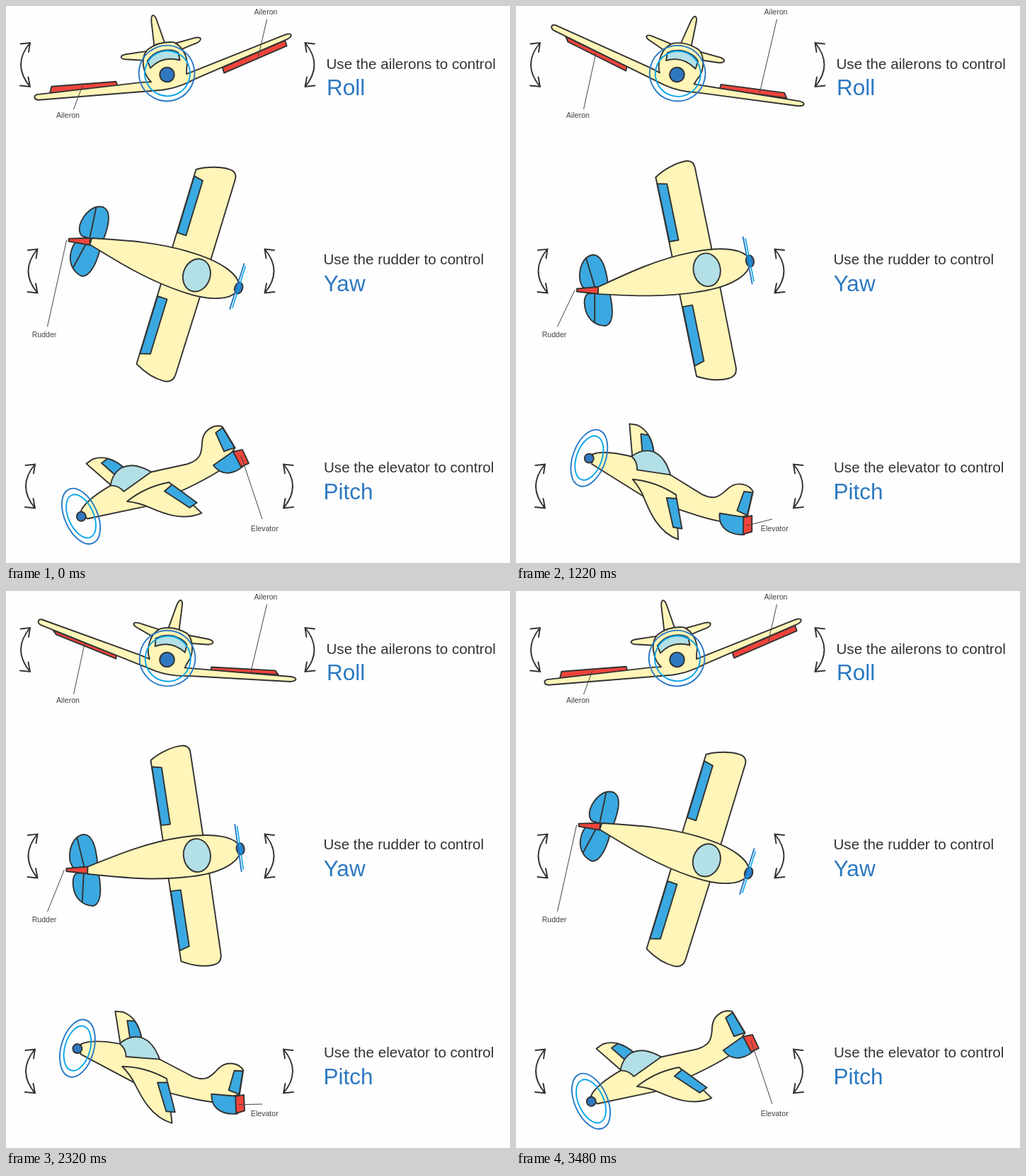
An HTML page for the animation above (3800 ms loop, 712 by 787 pixels).

```html
<!DOCTYPE html>
<html lang="en">
<head>
<meta charset="utf-8">
<title>Roll, yaw and pitch</title>
<style>
  html, body { margin: 0; width: 100%; height: 100%; overflow: hidden; background: #fefefe; }
  svg { display: block; width: 712px; height: 787px; font-family: "Liberation Sans", Arial, sans-serif; }
  .plane { stroke: #333; stroke-width: 1.9; stroke-linejoin: round; stroke-linecap: round; }
  .skin { fill: #fff5b8; }
  .flap { fill: #3aa9e1; }
  .moving { fill: #ee443b; }
  .glass { fill: #b2e0e6; }
  .hub { fill: #2f78c0; }
  .bare { fill: none; }
  .blade { fill: none; stroke: #2878c6; }
  .tip { fill: none; stroke: #08a5ea; }
  .lead { stroke: #444; stroke-width: 1; }
  .arrow { fill: none; stroke: #333; stroke-width: 1.9; stroke-linecap: round; }
  .note { font-size: 10.6px; fill: #444; text-anchor: middle; }
  .line { font-size: 20.6px; fill: #333; }
  .axis { font-size: 31.5px; fill: #2c78c1; }
</style>
</head>
<body>
<svg viewBox="0 0 712 787">
  <defs>
    <path id="arrow" class="arrow" d="M-13.5 1.5 0 0-2 13M0 0Q-26 31 0 62M-14 60.5 0 62-2.5 48.5"/>
  </defs>

  <g id="roll" class="plane">
    <path id="leftAileron" class="moving"/>
    <path id="rightAileron" class="moving"/>
    <path class="skin" d="M222 56 229 20Q231 11 234 11Q237 12 237 20L238 56Z"/>
    <path class="skin" d="M212 57 181 52C172 51 171 55 177 58L200 67Z"/>
    <path class="skin" d="M246 58 282 59.5C290 61 290 65 282 67L258 69Z"/>
    <path class="skin" d="M44 68 190 96.5 203 100C196 88 197 64 212 55Q230 48 250 56C262 66 263 86 257 96L254 104.5 404 94C414 94 414 99 404 101L262 115Q236 120 214 115.5L44 76C38 74 38 68 44 68Z"/>
    <path class="glass" d="M207 70Q217 62 230 62.5Q246 64 252 72L251 83Q229 69 208 81Z"/>
    <circle class="tip" cx="228.5" cy="95.5" r="32"/>
    <circle class="blade" cx="227.7" cy="95" r="39.3"/>
    <circle class="hub" cx="227.5" cy="97" r="10.3"/>
  </g>

  <g id="yaw" class="plane">
    <path class="skin" d="M222 234C235 225 254 219 267 219Q279 219 279 231L282 350 284 402 286 518Q286 531 273 532C259 533 242 528 229 521L226 403 225 350Z"/>
    <path class="flap" d="M222.5 243.5 236 246 238 327 225 327Z"/>
    <path class="flap" d="M227 421 241 421 243 501.5 229 506Z"/>
    <path class="flap" d="M129 370C130 350 128 328 115 326C101 326 91 342 91 360Q92 371 99 374L115 374Z"/>
    <path class="flap" d="M129 385C130 404 128 426 116 428C101 426 91 414 91 397Q91 383 98 379L115 381Z"/>
    <path class="bare" d="M105 329 110 373M108 381 101 420"/>
    <path class="skin" d="M113 372.5C160 360 205 348 252 347.5C298 346 330 356 332 374C330 394 298 405 256 404C206 404 160 393 113 382Z"/>
    <ellipse class="glass" cx="270" cy="375.5" rx="19" ry="23.5"/>
    <ellipse class="hub" cx="332" cy="374" rx="5.5" ry="8.2"/>
    <path class="blade" d="M328.5 339 329.5 406"/>
    <path class="tip" stroke-width="1.6" d="M331.5 342 332.5 403"/>
  </g>
  <g id="rudder" class="plane"><path class="moving" d="M0-5-30-2V2L0 5Z"/></g>

  <g id="pitch" class="plane">
    <path class="skin" d="M156 648 141 604 152 603C168 606 178 618 184 635L180 650Z"/>
    <path class="flap" d="M160 614 170.5 613Q179 621 184 635L168 638Z"/>
    <path class="skin" d="M101 658C112 650 135 648 156 648L181 640 214 660 264 676C282 680 288 674 295 664C301 654 307 649 317 648.5Q327 648 333.500 655L334 690 297 707C270 708 240 706 184 698.5L103 672Z"/>
    <path class="glass" d="M155 648C162 639 172 634 182 634C197 636 206 646 214.5 660L167 664.5Q165 653 155 648Z"/>
    <path class="flap" d="M321 658 333 656.5 333.5 689.5 318 686.5Z"/>
    <path class="flap" d="M295 696 329.5 693 336 717C319 722 298 719 295 696Z"/>
    <path class="skin" d="M164 679C184 676 208 678 229 685.5L247 746C217 743 198 717 187 702Q178 689 164 679Z"/>
    <path class="flap" d="M217 693 231 690.5 248.5 730 236 731Z"/>
    <g transform="rotate(6 97 664.5)">
      <ellipse class="tip" cx="97.3" cy="664.5" rx="17.8" ry="32.5"/>
      <ellipse class="blade" cx="97.3" cy="664.5" rx="23.1" ry="41.7"/>
    </g>
    <circle class="hub" cx="97.3" cy="665" r="6.5"/>
  </g>
  <g id="tail" class="plane"><path id="elevator" class="moving"/></g>

  <g class="lead">
    <line id="leftLead" x1="95.5" y1="146"/>
    <line id="rightLead" x1="368.5" y1="19"/>
    <line id="rudderLead" x1="58.5" y1="453"/>
    <line id="elevatorLead" x1="362" y1="725"/>
  </g>

  <use href="#arrow" transform="translate(34 52)"/>
  <use href="#arrow" transform="translate(422.5 52)scale(-1 1)"/>
  <use href="#arrow" transform="translate(44.5 343.5)"/>
  <use href="#arrow" transform="translate(365.5 343.5)scale(-1 1)"/>
  <use href="#arrow" transform="translate(41 647.5)"/>
  <use href="#arrow" transform="translate(392 647.5)scale(-1 1)"/>

  <text class="note" x="87.5" y="158">Aileron</text>
  <text class="note" x="367" y="12">Aileron</text>
  <text class="note" x="54" y="468">Rudder</text>
  <text class="note" x="365.3" y="742">Elevator</text>

  <text class="line" x="452.5" y="89">Use the ailerons to control</text>
  <text class="axis" x="453" y="126">Roll</text>
  <text class="line" x="448.5" y="365">Use the rudder to control</text>
  <text class="axis" x="448.7" y="402.5">Yaw</text>
  <text class="line" x="449" y="659">Use the elevator to control</text>
  <text class="axis" x="448.5" y="696.5">Pitch</text>
</svg>

<script>
const LOOP = 3800;
const $ = id => document.getElementById(id);

// Poses by step: the swing one way, then the way back.
const OUT = [0, 10, 16, 19], BACK = [19, 20, 25, 34, 40];
const ROLL = { out: [-13.4, 4.3, 17.5, 22], back: [22, 21.3, 13.1, -5.7, -13.4] };
const YAW = { out: [17, -1.4, -11.6, -16.7], back: [-16.7, -16, -8.6, 9.8, 17] };
const PITCH = { out: [-24.1, 6, 19.9, 24.4], back: [24.4, 23.9, 15.8, -10.5, -24.1] };

// Angles at which the three planes are drawn in the markup.
const REST = { roll: 4.3, yaw: -1.4, pitch: 6 };
const PIVOT = { roll: [227.5, 97], yaw: [254.5, 376], pitch: [206.5, 676.5] };

function stepAt(t) {
  if (t < 1900) return Math.min(19, Math.floor((t + 15) / 76.3));
  return Math.max(19, Math.min(40, 20 + Math.floor((t - 1928) / 77.5)));
}

// Cubic Hermite curve with softened ends.
function curve(xs, ys, x) {
  const last = xs.length - 1;
  const slope = i => (ys[i + 1] - ys[i]) / (xs[i + 1] - xs[i]);
  const tangent = i => i === 0 ? 0.6 * slope(0)
    : i === last ? 0.6 * slope(last - 1)
    : (slope(i - 1) + slope(i)) / 2;
  let i = 0;
  while (i < last - 1 && x > xs[i + 1]) i++;
  const h = xs[i + 1] - xs[i], u = (x - xs[i]) / h, v = 1 - u;
  return ys[i] * v * v * (1 + 2 * u) + ys[i + 1] * u * u * (3 - 2 * u)
    + h * u * v * (tangent(i) * v - tangent(i + 1) * u);
}

const angle = (axis, step) =>
  step <= 19 ? curve(OUT, axis.out, step) : curve(BACK, axis.back, step);

function turn([x, y], degrees, [cx, cy]) {
  const a = degrees * Math.PI / 180, c = Math.cos(a), s = Math.sin(a);
  return [cx + (x - cx) * c - (y - cy) * s, cy + (x - cx) * s + (y - cy) * c];
}

const polygon = points => "M" + points.map(p => p.join(" ")).join("L") + "Z";

function rotate(name, degrees) {
  $(name).setAttribute("transform", `rotate(${degrees} ${PIVOT[name].join(" ")})`);
}

function pointLead(id, [x, y]) {
  $(id).setAttribute("x2", x);
  $(id).setAttribute("y2", y);
}

// A strip hinged on the wing's centre line, showing past its edge by the deflection.
function aileron(id, outer, inner, inset, deflection) {
  const reach = Math.abs(deflection) < 1 ? 0 : Math.sign(deflection) * 6.8 + deflection;
  const hinge = Math.sign(reach) * 4.5;
  $(id).setAttribute("d", polygon([
    [outer[0], outer[1] + hinge], [outer[0] + inset, outer[1] + reach],
    [inner[0], inner[1] + reach], [inner[0], inner[1] + hinge]
  ]));
}

function drawRoll(degrees) {
  const d = degrees - REST.roll, down = Math.max(0, -d);
  rotate("roll", d);
  aileron("leftAileron", [62, 76], [156, 97], 5, 0.33 * d);
  if (d < 0) aileron("rightAileron", [401, 97], [305, 106.5], 0, -0.33 * d);
  else aileron("rightAileron", [386, 98.5], [291, 107.5], -5, -0.33 * d);
  pointLead("leftLead", turn([109, 86 + 0.6 * d], d, PIVOT.roll));
  pointLead("rightLead", turn([347 + 0.6 * down, 103 - 0.55 * d], d, PIVOT.roll));
}

function drawYaw(degrees) {
  const d = degrees - REST.yaw;
  rotate("yaw", d);
  const [x, y] = turn([114.5, 377], d, PIVOT.yaw);
  const hinge = [x - 0.008 * d * d, y], lean = 2 + 0.12 * degrees;
  $("rudder").setAttribute("transform", `translate(${hinge.join(" ")})rotate(${lean})`);
  pointLead("rudderLead", turn([hinge[0] - 33, hinge[1]], lean, hinge));
}

function drawPitch(degrees) {
  const k = (degrees + 24) / 48, [x, y] = PIVOT.pitch;
  rotate("pitch", degrees - REST.pitch);
  $("tail").setAttribute("transform", `translate(${x} ${y})rotate(${degrees})`);
  $("elevator").setAttribute("d", polygon([
    [123.5, 4], [136.6 - 2.8 * k, 6.8 - 9.7 * k],
    [137 + 5.2 * k, 27.9 - 9.4 * k], [125 + 7 * k, 28 - 1.3 * k]
  ]));
  pointLead("elevatorLead", turn([x + 131.3, y + 14], degrees, PIVOT.pitch));
}

function draw(t) {
  const step = stepAt(t % LOOP);
  drawRoll(angle(ROLL, step));
  drawYaw(angle(YAW, step));
  drawPitch(angle(PITCH, step));
}

const start = performance.now();
function tick() {
  draw(performance.now() - start);
  requestAnimationFrame(tick);
}
tick();
</script>
</body>
</html>
```
